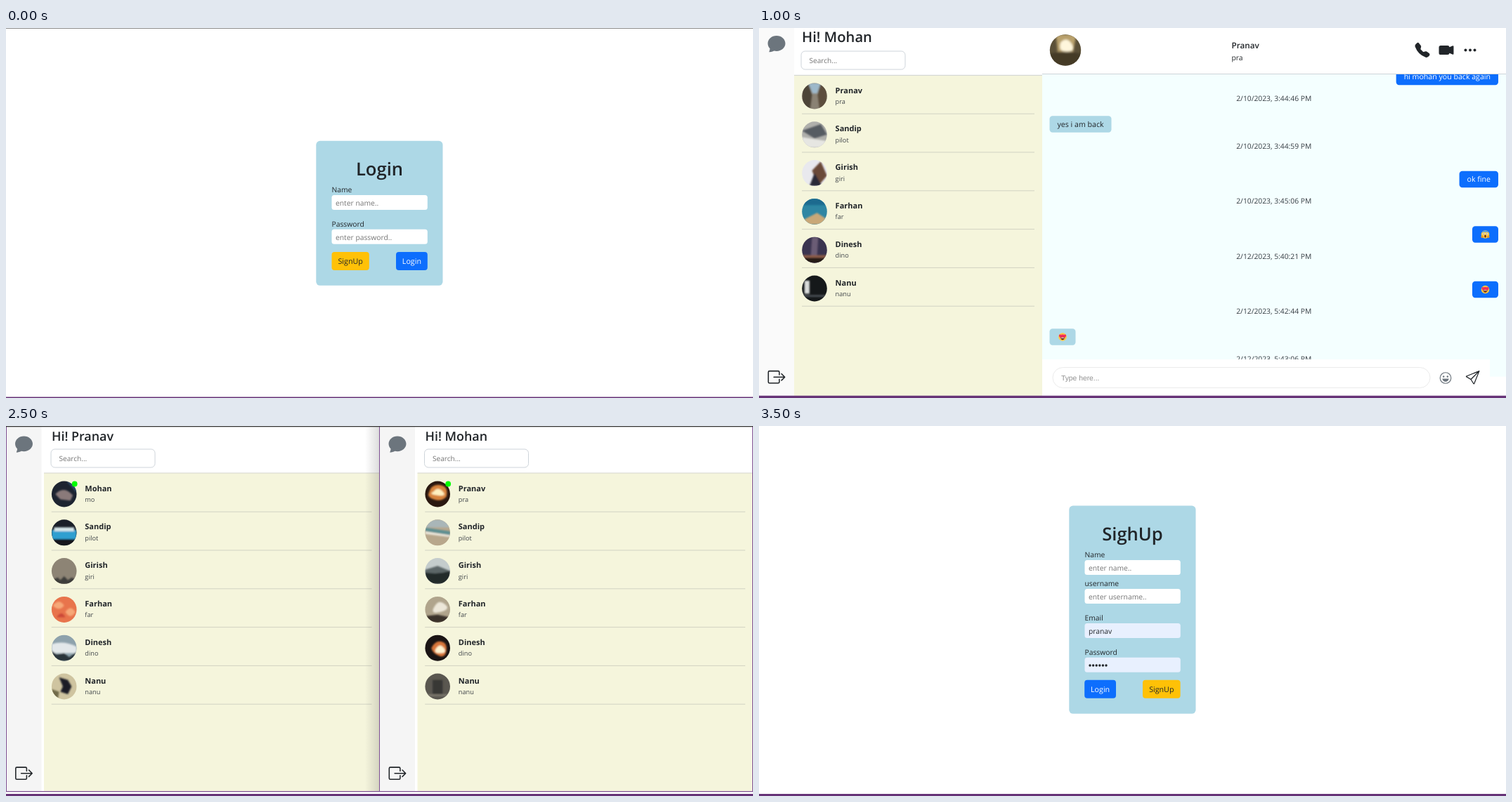
These frames come from a looping animation (1063 px wide and 527 px high, 4000 ms). An HTML page:

```html
<!DOCTYPE html>
<html lang="en">
<head>
<meta charset="utf-8">
<title>Chat app tour</title>
<style>
  html, body { margin: 0; width: 100%; height: 100%; overflow: hidden; background: #fff; }
  svg { display: block; }
  text { font-family: "Open Sans", "Noto Sans", sans-serif; white-space: pre; text-rendering: geometricPrecision; }
  .plain { font-family: "Liberation Sans", Arial, sans-serif; }
  .scene { visibility: hidden; animation: show 4s step-end infinite; }
  @keyframes show {
    0% { visibility: visible; }
    12.5%, 100% { visibility: hidden; }
  }
</style>
</head>
<body>
<svg id="stage" width="1063" height="527" viewBox="0 0 1063 527"></svg>
<script>
const INK = '#212529', BLUE = '#0d6efd', SKY = '#add8e6', AMBER = '#ffc107';
const AZURE = '#f0ffff', PALE = '#f4ffff', BEIGE = '#f5f5dc', PURPLE = '#663377', FRAME = '#7d4f92', GREY = '#757575';
const BODY = 10.3, BUBBLE = 10.6;

// Drawing helpers
const rect = (x, y, w, h, fill, r = 0, more = '') =>
  `<rect x="${x}" y="${y}" width="${w}" height="${h}" rx="${r}" fill="${fill}" ${more}/>`;
const dot = (x, y, r, fill) => `<circle cx="${x}" cy="${y}" r="${r}" fill="${fill}"/>`;
const path = (d, fill) => `<path d="${d}" fill="${fill}"/>`;
const line = (d, color, w = 1) =>
  `<path d="${d}" fill="none" stroke="${color}" stroke-width="${w}" stroke-linecap="round" stroke-linejoin="round"/>`;
const text = (x, y, s, size = BODY, fill = INK, more = '') =>
  `<text x="${x}" y="${y}" font-size="${size}" fill="${fill}" ${more}>${s}</text>`;
const at = (x, y, body, k = 1) => `<g transform="translate(${x} ${y}) scale(${k})">${body}</g>`;
const MID = 'text-anchor="middle"', SEMI = 'font-weight="600"', BOLD = 'font-weight="700"';
const PLAIN = 'class="plain"';

const ruler = document.createElement('canvas').getContext('2d');
ruler.font = `${BUBBLE}px "Open Sans", "Noto Sans", sans-serif`;
const widthOf = s => ruler.measureText(s).width;

// Round pictures: background, then [colour, path] layers inside a unit circle
const photos = {
  street: ['#8a8274', ['#9db8ca', 'M-.5-1H.5L.2-.2H-.15z'], ['#4e4438', 'M-1-1H-.5L-.2-.1-.35 1H-1z'], ['#5c4e3c', 'M1-1H.5L.25-.1 .4 1H1z']],
  desk: ['#b0b0ac', ['#565b62', 'M-1-.3L.5-.8 1 0 0 .3z'], ['#e6e6e2', 'M-1 .2L1 .5V1H-1z']],
  coat: ['#e9e9ee', ['#6b4a38', 'M-.2-.2L.5-.9 1 .2 .3 1z'], ['#2c2a38', 'M0 0L.6 1H-.4z']],
  shore: ['#2f86a3', ['#1d6b8f', 'M-1-1H1V-.5H-1z'], ['#c9a878', 'M-1 .7L.2 .1 1 .6V1H-1z']],
  night: ['#3a3450', ['#6a5c74', 'M-.2-1H.3L.2 .5H-.3z'], ['#8c5c48', 'M-1 .4H1V.7H-1z'], ['#251a18', 'M-1 .6H1V1H-1z']],
  sign: ['#15181a', ['#d9dcdb', 'M-.8-.6H-.4V.4H-.8z'], ['#4a5054', 'M-1 .5H1V.65H-1z']],
  sunset: ['#5b5038', ['#b8a06c', 'M-.6-1H.7L.5 .1H-.5z'], ['#fff6dc', 'M-.3-.5Q.1-.9 .4-.4T.1 .1-.3-.5z'], ['#443a28', 'M-1 .2Q0 .1 1 .2V1H-1z']],
  lake: ['#ddd8d8', ['#3a2c38', 'M-1-.9L-.1 0-.7 .9-1 1z'], ['#3a2c38', 'M1-.9L.1 0 .7 .9 1 1z'], ['#4b3a48', 'M-1-.1H1V.2H-1z']],
  grip: ['#1d2430', ['#8a7a7a', 'M-.7 0Q0-.7 .7 .1L.5 .5-.3 .4z'], ['#2f4a68', 'M.2-1H1V-.1z']],
  van: ['#1a1f28', ['#2f9fd0', 'M-1-.2H1V.5H-1z'], ['#d5e6ea', 'M-.8-.4H.8V-.1H-.8z'], ['#14181c', 'M-1 .5H1V1H-1z']],
  haze: ['#8d8475', ['#3e3c3a', 'M-1 .7L-.5 .5-.3 .7 0 .4 .3 .7 .6 .5 1 .7V1H-1z']],
  bloom: ['#e8744c', ['#f6a878', 'M-.9-.3Q-.4-.9 0-.3-.4 .2-.9-.3zM.1 .2Q.5-.4 .9 .2 .5 .8 .1 .2z'], ['#cc4a38', 'M-.6 .6Q-.2 0 .1 .6z']],
  fog: ['#8ea2ac', ['#e3e8ea', 'M-1-.3Q0-.6 1-.1V.4H-1z'], ['#2c343a', 'M-1 .2L-.6 .5 0 .4 .4 .7 1 .3V1H-1z']],
  berry: ['#cfc4a0', ['#1d1f26', 'M-.4-.7L.3-.5 .6 0 .3 .6-.3 .4-.1 0z'], ['#6f6a48', 'M-1 .2L-.4 .4-.5 1H-1z']],
  spark: ['#2a1810', ['#d8843c', 'M-.7-.1Q-.5-.8 .2-.7T.7 .2Q.3 .6-.3 .4T-.7-.1z'], ['#fff0c0', 'M-.3-.2Q0-.6 .4-.2T0 .1-.3-.2z']],
  coast: ['#b8a78c', ['#5f8f92', 'M-1-.4L1-.1V.2L-1-.1z'], ['#ece6da', 'M-1-.1L1 .2V.35L-1 .1z'], ['#a9b6b8', 'M-1-1H1V-.4H-1z']],
  valley: ['#c4cccc', ['#5c6668', 'M-1-.1L0-.4 1 0V.5H-1z'], ['#24292a', 'M-1 .1Q0 .3 1 0V1H-1z']],
  cloud: ['#b0a48c', ['#ece6d8', 'M-.2-.3Q.1-.8 .6-.4T.2 .2-.2-.3z'], ['#3a332c', 'M-1 .5L0 .4 1 .6V1H-1z']],
  flare: ['#1a1414', ['#d8763a', 'M-.5 0Q-.2-.6 .3-.5T.7 .2 .1 .6-.5 0z'], ['#fff2d0', 'M-.1 0Q.2-.4 .5 0T.2 .4-.1 0z']],
  porch: ['#5a5750', ['#383834', 'M-.4-.5H.4V.7H-.4z'], ['#7a766c', 'M-1 .6H1V.75H-1z']]
};
const photo = (name, x, y, rx, ry) => {
  const [bg, ...layers] = photos[name];
  return `<g transform="translate(${x} ${y}) scale(${rx} ${ry})" clip-path="url(#disc)">` + dot(0, 0, 1.5, bg) +
    `<g filter="url(#soft)">${layers.map(([c, d]) => path(d, c)).join('')}</g></g>`;
};

// Emoji faces: eyes, mouth, optional extra
const HEART = 'M0 .35C-.7-.1-.35-.6 0-.25 .35-.6 .7-.1 0 .35z';
const BROWN = '#5c3a12';
const eye = {
  o: dot(0, 0, .14, BROWN),
  '^': line('M-.2 .1Q0-.25 .2 .1', BROWN, .13),
  '-': line('M-.2 0H.2', BROWN, .13),
  x: line('M-.15-.15L.15 0-.15 .15', BROWN, .13),
  h: path(HEART, '#f0305c') + line(HEART, '#f0305c', .18),
  s: path('M0-.35L.12-.1 .35 0 .12 .1 0 .35-.12 .1-.35 0-.12-.1z', '#e8562a'),
  O: dot(0, 0, .25, '#fff') + dot(0, 0, .12, BROWN)
};
const mouth = {
  D: path('M-.55 .15H.55Q.4 .75 0 .75T-.55 .15z', '#6b2a14') + path('M-.45 .17H.45L.4 .3H-.4z', '#fff'),
  s: line('M-.4 .3Q0 .65 .4 .3', BROWN, .13),
  '-': line('M-.35 .4H.35', BROWN, .13),
  u: line('M-.3 .5Q0 .25 .3 .5', BROWN, .13),
  k: line('M0 .25Q.25 .3 0 .42 .25 .5 0 .6', BROWN, .12),
  p: path('M-.5 .2H.5Q.3 .6 0 .6T-.5 .2z', '#6b2a14') + path('M-.2 .4H.25V.75Q0 1-.2 .75z', '#f0506c'),
  O: `<ellipse cy=".45" rx=".22" ry=".35" fill="#6b2a14"/>`,
  g: rect(-.5, .2, 1, .35, '#fff', .1, `stroke="${BROWN}" stroke-width=".08"`),
  _: ''
};
const extra = {
  t: path('M.7-.8Q1 -.2 .7-.2T.7-.8z', '#4ab4f0'),
  j: path('M-.9 0Q-1.1 .6-.7 .5zM.9 0Q1.1 .6 .7 .5z', '#4ab4f0'),
  h: line('M-.6-.9Q0-1.2 .6-.9 0-.65-.6-.9', '#4ab4f0', .16),
  r: at(.7, .5, path(HEART, '#f0305c')) + at(-.7, .6, path(HEART, '#f0305c')),
  m: path('M-.2 .6Q.2 .1 .6 .5L.5 1H-.2z', '#e89a20'),
  a: dot(-.7, .7, .3, '#e89a20') + dot(.7, .7, .3, '#e89a20'),
  b: path('M-.9-.4Q0-1.6 .9-.4Q0-.7-.9-.4z', '#5aa0e0') + dot(-.75, .55, .3, '#e89a20') + dot(.75, .55, .3, '#e89a20')
};
const THUMB = path('M-.7-.1L-.1-.3 .1-1Q.5-1 .4-.2H.9Q1 .2 .8 .7 .6 1 .2 .9L-.7 .8z', '#ffc83d');
const face = (code, x, y, r) => {
  if (code === 'TH') return at(x, y, THUMB, r);
  const wink = code[0] === 'w', e = wink ? 'o' : code[0];
  return at(x, y, dot(0, 0, 1, '#ffc83d') + at(-.38, -.15, eye[e]) +
    at(.38, -.15, eye[wink ? '-' : e]) + mouth[code[1]] + (extra[code[2]] || ''), r);
};

// Icons on a 16-unit square, drawn around a centre point
const icon = (x, y, body, k) => at(x, y, at(-8, -8, body), k);
const PHONE = path('M1.885.511a1.745 1.745 0 0 1 2.61.163L6.29 2.98c.329.423.445.974.315 1.494l-.547 2.19a.68.68 0 0 0 .178.643l2.457 2.457a.68.68 0 0 0 .644.178l2.189-.547a1.75 1.75 0 0 1 1.494.315l2.306 1.794c.829.645.905 1.87.163 2.611l-1.034 1.034c-.74.74-1.846 1.065-2.877.702a18.6 18.6 0 0 1-7.01-4.42 18.6 18.6 0 0 1-4.42-7.009c-.362-1.03-.037-2.137.703-2.877z', INK);
const CAMERA = path('M0 5a2 2 0 0 1 2-2h7.5a2 2 0 0 1 1.983 1.738l3.11-1.382A1 1 0 0 1 16 4.269v7.462a1 1 0 0 1-1.406.913l-3.111-1.382A2 2 0 0 1 9.5 13H2a2 2 0 0 1-2-2z', INK);
const DOTS = [3, 8, 13].map(x => dot(x, 8, 1.5, INK)).join('');
const TALK = path('M8 15c4.418 0 8-3.134 8-7s-3.582-7-8-7-8 3.134-8 7c0 1.76.743 3.37 1.97 4.6-.097 1.016-.417 2.13-.771 2.966-.079.186.074.394.273.362 2.256-.37 3.597-.938 4.18-1.234A9 9 0 0 0 8 15', '#6c757d');
const EXIT = line('M10.5 6V3.5a1 1 0 0 0-1-1h-8a1 1 0 0 0-1 1v9a1 1 0 0 0 1 1h8a1 1 0 0 0 1-1V10M5.5 8H15.5M12.5 5L15.5 8 12.5 11', INK);
const SEND = line('M15.5.5L.9 6.4a.3.3 0 0 0 0 .5L6 10 9.2 15a.3.3 0 0 0 .5 0zM15.5.5L6 10', INK);
const smile = (c = '#6c757d') => line('M.5 8a7.5 7.5 0 1 0 15 0a7.5 7.5 0 1 0-15 0', c, 1.1) +
  dot(5.3, 6, 1.2, c) + dot(10.7, 6, 1.2, c) + path('M3.5 9H12.5Q11.8 13 8 13T3.5 9z', c);

// Page parts
const sidebar = (x, talkY, exitY) => icon(x, talkY, TALK, 1.56) + icon(x, exitY, EXIT, 1.56);
const foot = y => rect(0, y, 1063, 527 - y, PURPLE);

const search = (x, y) => rect(x, y, 148, 26, '#fff', 5.5, 'stroke="#ced4da"') + text(x + 11.5, y + 17, 'Search...', 10.1, GREY);

const contacts = (x, end, y, people, pics) => people.map(([name, nick, on], i) => {
  const cy = y + i * 54.8;
  return photo(pics[i], x + 18, cy, 17.8, 18.5) + (on ? dot(x + 33, cy - 14.5, 3.9, '#0f0') : '') +
    text(x + 47.6, cy - 4.5, name, 11, INK, BOLD) + text(x + 47.6, cy + 11, nick, 9.2, '#41464a') +
    rect(x, cy + 24.7, end - x, 1, '#d2d3c3');
}).join('');

const header = (x, name, nick, pic, nameX, phoneX, y) =>
  photo(pic, x, y, 22.2, 22.2) + text(nameX, y - 3, name, 11.7, INK, SEMI) + text(nameX, y + 14.2, nick) +
  icon(phoneX, y, PHONE, 1.31) + icon(phoneX + 34, y, CAMERA, 1.31) + icon(phoneX + 68, y, DOTS, 1.31);

const typing = (x, w, y, draft, tint) =>
  rect(x, y - 14.5, w, 29, '#fff', 14.5, 'stroke="#ebebeb"') +
  text(x + 12, y + 3.7, draft || 'Type here...', BODY, draft ? '#333' : '#8f8f8f', PLAIN) +
  icon(x + w + 22, y + .5, smile(tint), 1.04) + icon(x + w + 60.5, y, SEND, 1.25);

// '>' is sent, '<' is received; y is the middle of the first bubble
const emoji = { ':scream': 'OOb', ':love': 'hD' };
const thread = (x0, x1, y, list) => list.map(([side, msg, when], i) => {
  const sent = side === '>', code = emoji[msg];
  if (i) y += sent ? 78.5 : 67.5;
  const w = code ? 37 : widthOf(msg) + 22;
  const x = sent ? x1 - w : x0;
  return rect(x, y - 11.7, w, 23.4, sent ? BLUE : SKY, 4.2) +
    (code ? face(code, x + w / 2, y, 5.8) : text(x + 11, y + 3.8, msg, BUBBLE, sent ? '#fff' : INK)) +
    text((x0 + x1) / 2, y + 34.8, when, BODY, '#343a40', MID);
}).join('');
const clip = (top, bottom, body) =>
  `<svg y="${top}" width="1063" height="${bottom - top}" viewBox="0 ${top} 1063 ${bottom - top}">${body}</svg>`;

// Cast and messages
const crew = [['Sandip', 'pilot'], ['Girish', 'giri'], ['Farhan', 'far'], ['Dinesh', 'dino'], ['Nanu', 'nanu']];
const forMohan = on => [['Pranav', 'pra', on], ...crew];
const forPranav = [['Mohan', 'mo', true], ...crew];
const cityPics = ['street', 'desk', 'coat', 'shore', 'night', 'sign'];
const naturePics = ['grip', 'van', 'haze', 'bloom', 'fog', 'berry'];
const glowPics = ['spark', 'coast', 'valley', 'cloud', 'flare', 'porch'];

const D10 = '2/10/2023, ', D12 = '2/12/2023, ', D20 = '2/20/2023, ';
const pranavLog = [
  ['>', 'yes i am back', D10 + '3:44:59 PM'], ['<', 'ok fine', D10 + '3:45:06 PM'],
  ['<', ':scream', D12 + '5:40:21 PM'], ['<', ':love', D12 + '5:42:44 PM'],
  ['>', ':love', D12 + '5:43:06 PM'], ['>', 'hi', D20 + '6:42:19 PM'], ['<', 'hi pranav', 'Invalid Date']
];
const mohanLog = [
  ['>', 'ok fine', D10 + '3:45:06 PM'], ['>', ':scream', D12 + '5:40:21 PM'],
  ['>', ':love', D12 + '5:42:44 PM'], ['<', ':love', D12 + '5:43:06 PM'],
  ['<', 'hi', D20 + '6:42:19 PM'], ['>', 'hi mohan', D20 + '6:42:59 PM'], ['>', 'hi pranav', D20 + '6:46:30 PM']
];
const earlier = [['>', 'hi mohan you back again', D10 + '3:44:46 PM'], ['<', 'yes i am back', D10 + '3:44:59 PM']];
const sandipLog = [['>', 'hi sandip', '2/9/2023, 7:28:47 PM'], ['>', 'hi sand', '2/9/2023, 7:29:23 PM'], ['<', 'hi pranav', '2/9/2023, 7:29:29 PM']];

// Forms
const field = (y, label, value, filled) => text(463.5, y - 4, label) +
  rect(463.5, y, 136.3, 21, filled ? '#e8f0fe' : '#fff', 3.5) + text(469, y + 14.8, value, BODY, filled ? INK : GREY);
const button = (x, y, w, label, fill, ink) => rect(x, y, w, 26, fill, 4) + text(x + w / 2, y + 16.8, label, 10.7, ink, MID);
const card = (y, h, title) => rect(441.3, y, 180.2, h, SKY, 5.5) + text(531.5, y + 49, title, 25.6, INK, MID + ' ' + SEMI);

const login = rect(0, 0, 1063, 1, '#8c8c8c') + card(160.8, 206, 'Login') +
  field(238, 'Name', 'enter name..') + field(286.8, 'Password', 'enter password..') +
  button(463.5, 319, 53.3, 'SignUp', AMBER, INK) + button(555, 319, 44.8, 'Login', BLUE, '#fff') + foot(525.5);

const signup = card(113.6, 296.2, 'SighUp') +
  field(191, 'Name', 'enter name..') + field(232, 'username', 'enter username..') +
  field(281, 'Email', 'pranav', true) + field(329.8, 'Password', '', true) +
  [0, 1, 2, 3, 4, 5].map(i => dot(471 + i * 4.6, 341, 1.7, INK)).join('') +
  button(463.2, 361.8, 44.8, 'Login', BLUE, '#fff') + button(546, 361.8, 53.6, 'SignUp', AMBER, INK) + foot(524);

// One window: contact list beside a chat
const single = (dy, owner, people, pics, chat) =>
  rect(0, 0, 50, 527, '#fafafa') + sidebar(25, 22 + dy, 497.2 + dy) +
  rect(50, 67 + dy, 353, 460, BEIGE) + rect(50, 66.8 + dy, 353, 1, '#cdd0d3') +
  text(61, 20 + dy, 'Hi! ' + owner, 20.2, INK, SEMI) + search(60, 33 + dy) +
  contacts(61, 392, 97 + dy, people, pics) +
  rect(403, 66 + dy, 660, 430.5, PALE) + chat + foot(523.7 + dy * .7);
const chatPane = (dy, name, nick, pic, y, list, tint) =>
  clip(66 + dy, 472, thread(413.5, 1052, y, list)) + rect(403, 65 + dy, 660, 1, '#cdd3d8') +
  header(436, name, nick, pic, 672.5, 944, 31.5 + dy) + rect(403, 472, 637, 26, '#fff') +
  typing(418, 537, 498 + dy * .6, '', tint);

const home = single(0, 'Mohan', forMohan(), cityPics, '');
const reply = single(0, 'Mohan', forMohan(), cityPics,
  chatPane(0, 'Pranav', 'pra', 'sunset', 69.5, [...earlier, ...mohanLog.slice(0, 4)]));

// Two windows side by side
const pair = (left, right, bottom) => left + at(531.5, 0, right) +
  rect(511, 0, 20, bottom, 'url(#shade)') +
  [0, 531, 1062].map(x => rect(x, 0, 1, bottom, FRAME)).join('') +
  rect(0, bottom - .5, 1063, 1.2, FRAME) + foot(524);
const chatWin = (name, nick, pic, y, list, draft) =>
  rect(0, 0, 50.5, 518, '#f5f5f5') + sidebar(25.5, 22.8, 492) + rect(54, 66, 477, 400, AZURE) +
  clip(66, 466, thread(65, 520.5, y, list)) + rect(54, 65.2, 477, 1, '#c6d3da') +
  header(87, name, nick, pic, 243, 435, 32.2) + typing(69, 377, 492.3, draft);
const listWin = (owner, people, pics) =>
  rect(0, 0, 50.5, 520, '#f5f5f5') + sidebar(25.5, 25.3, 494.7) + rect(54, 67, 477, 453, BEIGE) +
  rect(54, 66.5, 477, 1, '#d5d6cf') + text(65, 21, 'Hi! ' + owner, 17.9, INK, SEMI) +
  search(64, 33) + contacts(64.7, 520.5, 97, people, pics);
const duo = (from, picL, picR, draft) => rect(50, 519, 353, 5, BEIGE) + pair(
  chatWin('Mohan', 'mo', picL, 77, pranavLog.slice(from, from + 6)),
  chatWin('Pranav', 'pra', picR, 65.5, mohanLog.slice(from, from + 6), draft), 518) +
  dot(958, 487.5, 6.6, '#15c39a');
const lists = pair(listWin('Pranav', forPranav, naturePics), listWin('Mohan', forMohan(true), glowPics), 520.5) +
  rect(0, 0, 1063, 1.3, '#3a3a3a');

// Emoji picker
const tabs = [
  'M-6 0a6 6 0 1 0 12 0a6 6 0 1 0-12 0M0-3.5V.5H3',
  'M-6 0a6 6 0 1 0 12 0a6 6 0 1 0-12 0M-2-2v.4M2-2v.4M-3 1.5Q0 5 3 1.5z',
  'M-4-3L-6-5-5 0Q-4 6 0 6T5 0L6-5 4-3Q0-6-4-3M-2-1v.5M2-1v.5M-1.5 2H1.5L0 4z',
  'M0-3Q-6-5-6 1T-1 6H1Q6 6 6 1T0-3Q0-6 2-6',
  'M-6 0a6 6 0 1 0 12 0a6 6 0 1 0-12 0M-6 0H6M0-6V6M-4-4.5Q0 0-4 4.5M4-4.5Q0 0 4 4.5',
  'M-6 4V0L-4-4H4L6 0V4zM-6 0H6M-4 4V5.5M4 4V5.5M-3 2h.5M3 2h.5',
  'M-2 3Q-4 1-4-2A4 4 0 0 1 4-2Q4 1 2 3zM-2 5H2M-1 6.5H1M0 3V-1',
  'M-5-5H-1M-3-5V-1M2-5H5L2-1H5M-5 1L-1 5M-1 1L-5 5M5 1L1 6M1.5 1.5h.3M4.5 5h.3',
  'M-5-5L-3 6M-5-5L0-4 1-2 5-3 5.5 3 2 3 0 1-4 2'
];
const faces = [
  [323, 'TH oD wk hD xD wp ^Dt ^Dj OOb'],
  [368, 'oD oD ^D ^D xD ^Dt ^Dj ^Dj os'],
  [393, 'os ws ^s ^sh ^sr hD sD wk ok'],
  [417.8, '^s ^k ^k ^p op wp Op xp op'],
  [442.5, '^sa ^sm o-m o-m og o- o- -- o_'],
  [467.3, 'os -u O- og o-t -s -u -ut -s']
];
const picker = rect(765, 234.3, 233, 243.5, '#222', 3, 'stroke="#161616"') +
  tabs.map((d, i) => at(784.8 + i * 24.9, 250, line(d, i ? '#858585' : '#ae65c5', 1.1))).join('') +
  rect(765, 264.5, 233, 1, '#484848') + rect(769, 263, 25, 1.8, '#ae65c5') +
  rect(769, 269.2, 225, 21.8, '#333', 3, 'stroke="#484848"') + text(776.5, 283.5, 'Search', 11.2, '#8a8a8a', PLAIN) +
  line('M972 282a3 3 0 1 0 6 0a3 3 0 1 0-6 0M977.2 284.2L980 287', '#999', 1.2) +
  text(773, 304.3, 'Frequently Used', 11.2, '#fff', PLAIN) + text(773, 349.3, 'Smileys &amp; People', 11.2, '#fff', PLAIN) +
  clip(312, 476.5, faces.map(([y, row]) => row.split(' ').map((c, i) => face(c, 781.6 + i * 24.9, y, 7.3)).join('')).join(''));
const emojiPage = single(1.6, 'Pranav', forPranav, naturePics,
  chatPane(1.6, 'Sandip', 'pilot', 'street', 89.2, sandipLog, '#1b7a9c') + picker);

const scenes = [login, home, reply, duo(0, 'fog', 'valley', 'hi pranav'), duo(1, 'street', 'lake'), lists, emojiPage, signup];
const defs = '<defs><clipPath id="disc"><circle r="1"/></clipPath>' +
  '<filter id="soft"><feGaussianBlur stdDeviation=".07"/></filter>' +
  '<linearGradient id="shade"><stop stop-color="#555" stop-opacity="0"/><stop offset="1" stop-color="#555" stop-opacity=".2"/></linearGradient></defs>';
document.getElementById('stage').innerHTML = defs + scenes.map((s, i) =>
  `<g class="scene" style="animation-delay:${i * .5 - 4}s">${rect(0, 0, 1063, 527, '#fff')}${s}</g>`).join('');
</script>
</body>
</html>
```
